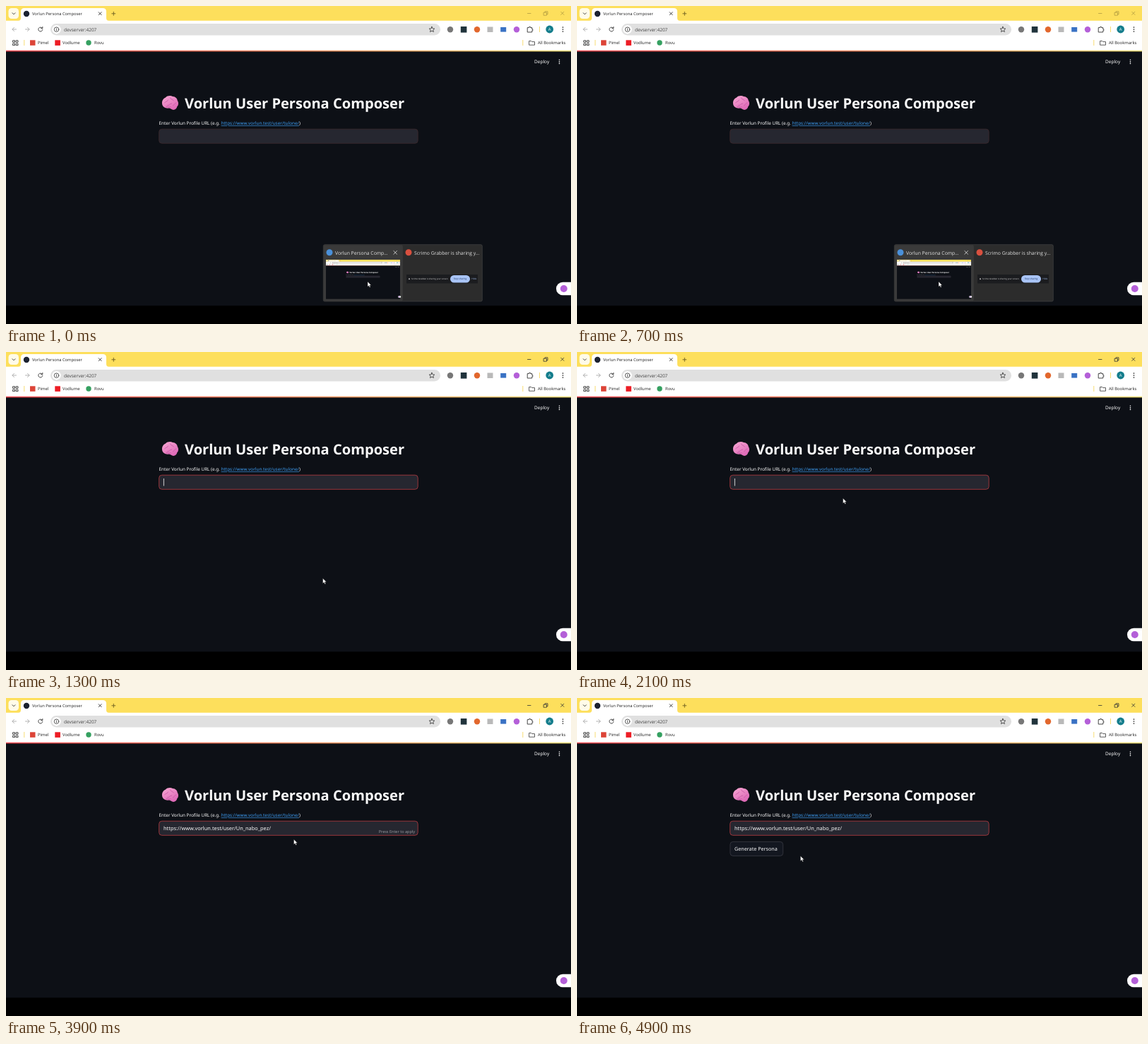
Animation, 800 px wide and 450 px high, one loop 5000 ms. Source, as an HTML page:

```html
<!DOCTYPE html>
<html lang="en">
<head>
<meta charset="utf-8">
<title>Persona demo</title>
<style>
html, body { margin: 0; width: 100%; height: 100%; overflow: hidden; background: #000; }
svg { display: block; width: 100vw; height: 100vh; }
text { font: 5.9px "Open Sans", "Noto Sans", sans-serif; fill: #222; text-rendering: geometricPrecision; white-space: pre; }
.web text { font-family: "Noto Sans", "Open Sans", sans-serif; font-weight: 500; fill: #fafafa; }
.line { fill: none; stroke: #333; stroke-width: .9; stroke-linecap: round; stroke-linejoin: round; }
.thin { stroke-width: .8; }
.sep { stroke: #f7dc74; stroke-width: 1; }
.pop text { fill: #e2e2e2; font-size: 6.8px; }
</style>
</head>
<body>
<svg viewBox="0 0 800 450">
  <defs>
    <linearGradient id="strip"><stop stop-color="#f04a52"/><stop offset=".5" stop-color="#f28a60"/><stop offset="1" stop-color="#f3e27a"/></linearGradient>
    <linearGradient id="pink" x2=".7" y2="1"><stop stop-color="#f9a9d4"/><stop offset="1" stop-color="#dd68b6"/></linearGradient>
  </defs>
  <rect width="800" height="450"/>

  <g id="page">
    <!-- tab strip -->
    <rect width="800" height="22" fill="#fddf5c"/>
    <rect x="3.5" y="3" width="14.5" height="15" rx="4.5" fill="#fffbe8"/>
    <path class="line" d="M9 9.8l2 2 2-2"/>
    <path d="M17 21q4 0 4-4V8q0-5 5-5H137q5 0 5 5v9q0 4 4 4z" fill="#fff"/>
    <circle cx="29" cy="11" r="4.2" fill="#1c2230"/>
    <text x="37" y="13.2" style="font-size:5.8px">Vorlun Persona Composer</text>
    <path class="line" d="M131.2 8.7l4 4m0-4l-4 4"/>
    <path class="line" d="M149.8 10.8h5m-2.5-2.5v5" style="stroke:#6b5d20"/>
    <path class="line thin" id="controls" d="M738.5 10.5h4.5M761.5 9.2h4v4h-4zM763 9v-1.2h4v4h-1.2M785.7 8.2l4.2 4.2m0-4.2l-4.2 4.2"/>

    <!-- toolbar -->
    <rect y="20.8" width="800" height="43.2" fill="#fff"/>
    <path class="line" d="M14.5 33h-5.5m2.5-2.6l-2.6 2.6 2.6 2.6M27.5 33h5.5m-2.5-2.6l2.6 2.6-2.6 2.6" style="stroke:#aaa"/>
    <path class="line" d="M51.2 31.2a3 3 0 1 0 .6 2.4M51.8 29.5v2.3h-2.3"/>
    <rect x="63" y="25" width="552" height="16.5" rx="8.2" fill="#e0e0e0"/>
    <circle cx="71.5" cy="33.2" r="6.2" fill="#fff"/>
    <circle class="line thin" cx="71.5" cy="33.2" r="3.3"/>
    <path class="line thin" d="M71.5 33v1.8M71.5 31.5v.1"/>
    <text x="82" y="35.5" style="font-size:6.5px;fill:#444">devserver:4207</text>
    <path class="line thin" d="M603 29.3l1.1 2.5 2.7.3-2 1.8.6 2.7-2.4-1.4-2.4 1.4.6-2.7-2-1.8 2.7-.3z"/>
    <circle cx="629" cy="33.2" r="4.2" fill="#777"/>
    <rect x="643.8" y="29" width="8.6" height="8.6" fill="#20333c"/>
    <circle cx="667" cy="33.2" r="4.2" fill="#e2672d"/>
    <rect x="681.5" y="29.5" width="8" height="7.5" fill="#b9b9b9"/>
    <rect x="700.2" y="30" width="8" height="6.6" fill="#3a72c4"/>
    <circle cx="723" cy="33.2" r="4.2" fill="#b45fd8"/>
    <path class="line" d="M738.6 30.6h2v-1h2v1h2.2v2.2h1v2h-1v2.2h-6.2z"/>
    <path class="sep" d="M755.5 29v8"/>
    <circle cx="769.7" cy="33" r="5.4" fill="#147d8c"/>
    <text x="769.7" y="35.1" text-anchor="middle" style="fill:#fff">A</text>
    <path d="M788.5 30v.1M788.5 33v.1M788.5 36v.1" stroke="#333" stroke-width="1.7" stroke-linecap="round"/>

    <!-- bookmarks -->
    <path class="line" d="M10 48.8h2.5v2.5h-2.5zM14.5 48.8h2.5v2.5h-2.5zM10 53.2h2.5v2.5h-2.5zM14.5 53.2h2.5v2.5h-2.5z"/>
    <path class="sep" d="M25.8 48v8M731.8 48v8"/>
    <rect x="34" y="48.3" width="7.5" height="7.5" fill="#dc4437"/>
    <text x="45" y="54.2">Pimel</text>
    <rect x="69.3" y="48.3" width="7.6" height="7.6" fill="#ed1c24"/>
    <text x="80" y="54.2">Vodlume</text>
    <circle cx="117" cy="52" r="3.7" fill="#34a060"/>
    <text x="125" y="54.2">Rovu</text>
    <path class="line thin" d="M741 49.5h2.7l1 1.1h3.8v4.6h-7.5z"/>
    <text x="753" y="54.2">All Bookmarks</text>

    <!-- web page -->
    <g class="web">
      <rect y="64" width="800" height="360" fill="#0d1016"/>
      <rect y="62.8" width="800" height="1.6" fill="url(#strip)"/>
      <text x="748" y="81.3" style="font-size:6.5px">Deploy</text>
      <path d="M783.5 76.2v.1M783.5 78.8v.1M783.5 81.4v.1" stroke="#fafafa" stroke-width="1.6" stroke-linecap="round"/>
      <path d="M221 138c-.4-4 2-7.5 5-8.5 2.5-2.8 7-3 10-1.6 4 .2 6.5 3 6.8 6 1.9 2.7 1.5 6.6-.6 8.4-.2 2.5-2.4 4.7-5 4.7-2.8.2-3.7-2.6-6.5-2.5-4 .8-9.2-1-9.7-6.5z" fill="url(#pink)"/>
      <path class="line thin" d="M224.5 137c2-3 4-1 5-4m-1 8c3 0 3-3 6-3m-2-8c1 3 4 2 5 4m-1 7c1-2 3-2 4-4m-14 5c2 2 5 1 7 1" style="stroke:#c455a2"/>
      <text x="253" y="144.5" style="font-size:20.1px;font-weight:700">Vorlun User Persona Composer</text>
      <text x="216.5" y="168" style="font-size:6.38px">Enter Vorlun Profile URL (e.g. <tspan fill="#3d9df3" text-decoration="underline">https://www.vorlun.test/user/tulone/</tspan>)</text>
      <rect id="field" x="216.7" y="174.2" width="366.5" height="20.1" rx="4" fill="#262730" stroke-width=".9"/>
      <text id="typed" x="223" y="186.5" style="font-size:7.4px">https://www.vorlun.test/user/Un_nabo_pez/</text>
      <text id="hint" x="579" y="190.7" text-anchor="end" style="font-size:5.5px;fill:#96979d">Press Enter to apply</text>
      <path id="caret" d="M0 179v10.5" stroke="#fafafa" stroke-width=".8"/>
      <g id="button">
        <rect x="216.9" y="203.4" width="74.8" height="20" rx="4" fill="#131720" stroke="#3a3c45" stroke-width=".8"/>
        <text x="223" y="215.6" style="font-size:7.2px">Generate Persona</text>
      </g>
      <rect x="779" y="390.7" width="30" height="18.6" rx="9.3" fill="#fff"/>
      <circle cx="789.8" cy="400" r="5" fill="#b45fd8"/>
    </g>
  </g>

  <!-- taskbar previews -->
  <g id="popup" class="pop">
    <rect x="449.3" y="337.7" width="225" height="80.3" rx="2" fill="#2c2c2c" stroke="#444" stroke-width=".7"/>
    <rect x="449.8" y="338.2" width="112" height="79.3" rx="2" fill="#3a3a3a"/>
    <circle cx="458" cy="348.8" r="4.5" fill="#4a90d9"/>
    <text x="466" y="351.7">Vorlun Persona Comp...</text>
    <path class="line thin" d="M548.8 346.5l4.8 4.8m0-4.8l-4.8 4.8" style="stroke:#ddd"/>
    <use href="#page" transform="translate(453 359) scale(.1312)"/>
    <circle cx="570" cy="348.8" r="4.5" fill="#d9503f"/>
    <text x="578" y="351.7">Scrimo Grabber is sharing y...</text>
    <rect x="567" y="380" width="101" height="12.5" fill="#1b1c1f"/>
    <circle cx="571" cy="386.2" r="1" fill="#bbb"/>
    <text x="574" y="387.4" style="font-size:2.9px">Scrimo Grabber is sharing your screen</text>
    <rect x="629" y="381" width="28" height="10.5" rx="5.2" fill="#a9c4f6"/>
    <text x="643" y="387.3" text-anchor="middle" style="font-size:3.2px;fill:#17315c">Stop sharing</text>
    <text x="659.3" y="387.4" style="font-size:3.2px;fill:#a9c4f6">Hide</text>
  </g>

  <path id="pointer" d="M0 0V7.2L1.7 5.7 2.9 8.3 4.1 7.7 2.9 5.2H5.2Z" fill="#fff" stroke="#111" stroke-width=".4"/>
</svg>
<script>
const LOOP = 5000, STEP = 100, BLINK = 530;
const FOCUS = 1000, PASTE = 2200, ENTER = 4100;
// time, x, y
const path = [
  [0, 512, 390], [1200, 512, 390], [1300, 448.6, 320.3], [1700, 376.6, 207], [2400, 376.6, 207],
  [2900, 406.5, 200.5], [3300, 407.5, 201.5], [3700, 407.5, 200], [4200, 407.5, 200], [4900, 316.4, 223.5], [5000, 316.4, 223.5]
];
const el = id => document.getElementById(id);
const show = (id, on) => el(id).style.display = on ? "" : "none";
const ease = k => k * k * (3 - 2 * k);

function pointerAt(t) {
  const i = path.findIndex(p => p[0] > t);
  const [t0, x0, y0] = path[i - 1], [t1, x1, y1] = path[i];
  const k = ease((t - t0) / (t1 - t0));
  return [x0 + (x1 - x0) * k, y0 + (y1 - y0) * k];
}

function draw(now) {
  const t = Math.floor(now % LOOP / STEP) * STEP;
  const focused = t >= FOCUS, pasted = t >= PASTE;
  const blinkStart = pasted ? PASTE : FOCUS;
  show("popup", !focused);
  show("typed", pasted);
  show("hint", pasted && t < ENTER);
  show("button", t >= ENTER);
  show("caret", focused && Math.floor((t - blinkStart) / BLINK) % 2 === 0);
  const caretX = pasted ? 223.5 + el("typed").getComputedTextLength() : 223.4;
  el("caret").setAttribute("transform", `translate(${caretX})`);
  el("field").setAttribute("stroke", focused ? "#a8383f" : "#3a292d");
  el("controls").style.stroke = focused ? "#333" : "#b29c40";
  el("pointer").setAttribute("transform", `translate(${pointerAt(t)})`);
  requestAnimationFrame(draw);
}
requestAnimationFrame(draw);
</script>
</body>
</html>
```
